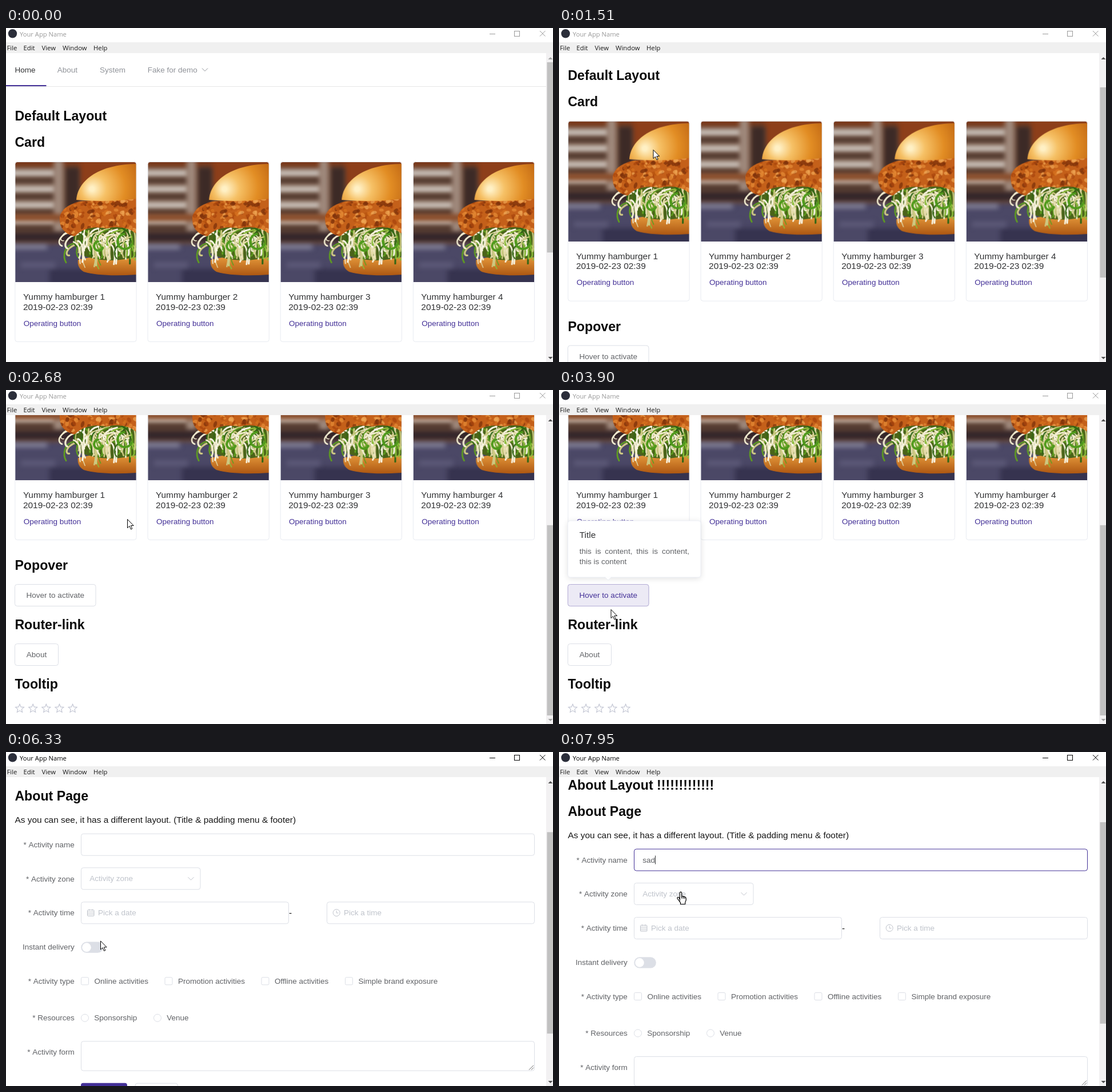
An HTML page with a canvas that plays this animation: 957 by 585 pixels, repeating every 8 s.

```html
<!DOCTYPE html>
<html lang="en">
<head>
<meta charset="utf-8">
<title>App demo</title>
<style>
html, body { margin: 0; width: 100%; height: 100%; overflow: hidden; background: #fff; }
canvas { display: block; width: 957px; height: 585px; }
</style>
</head>
<body>
<canvas id="stage" width="957" height="585"></canvas>
<script>
const LOOP = 8000, W = 957, H = 585, TOP = 44, VIEW = H - TOP;
const THEME = '#433097', INK = '#303133', BODY = '#606266', MUTED = '#909399',
      FAINT = '#bfc3cb', LINE = '#dcdfe6';
const SANS = '"Liberation Sans", Arial, sans-serif', UI = '"Open Sans", "Noto Sans", sans-serif';
const SMALL = 13.51, MEDIUM = 15.44, LARGE = 23.16;
const ctx = document.getElementById('stage').getContext('2d');

// Screen updates come in bursts: [start, end, steps]
const BURSTS = [[0, 0, 1], [350, 1140, 11], [1200, 1970, 11], [2040, 2680, 9], [2830, 3290, 7],
  [3900, 4680, 11], [5000, 5000, 1], [5230, 6010, 11], [6080, 6870, 11], [6950, 7040, 2],
  [7180, 7260, 2], [7410, 7950, 8]];

// Pointer keys: time, x, y, shape (arrow when omitted)
const POINTER = [[350, 795, 572], [1140, 97, 135], [1200, 108, 148], [1431, 155, 205],
  [1508, 164.5, 213], [1739, 190.5, 233], [1970, 198, 229], [2400, 374, 182], [2680, 212, 226],
  [2830, 200, 240], [3060, 110, 344, 'hand'], [3290, 93, 369, 'hand'], [3900, 90.5, 384],
  [4134, 66, 450, 'hand'], [4290, 62, 557, 'hand'], [4446, 60, 500], [4602, 59.5, 469, 'hand'],
  [5000, 59.5, 469], [5230, 62, 455], [5620, 110, 72, 'hand'], [5700, 116, 112], [6010, 165, 332],
  [6396, 165, 330, 'hand'], [6791, 165, 328, 'hand'], [6870, 165, 328, 'hand'], [6950, 185, 300],
  [7040, 201, 284], [7180, 197, 235], [7260, 193, 189, 'text'], [7718, 193, 189, 'text'],
  [7950, 213, 244.5, 'hand']];
const HOME_SCROLL = [[1431, 0], [1508, 71.3], [1585, 150], [1662, 245], [1739, 285], [1816, 287]];
const ABOUT_SCROLL = [[6010, 0], [6080, 20], [6238, 96.5], [6396, 150], [6554, 193], [6800, 193],
  [6870, 180], [6950, 120], [7040, 96.5]];

function snap(t) {
  const [start, end, steps] = BURSTS.filter(b => b[0] <= t).pop();
  const dt = (end - start) / (steps - 1) || 1;
  return Math.min(end, start + Math.floor((t - start) / dt + 1e-6) * dt);
}
function at(keys, t, col = 1) {
  const next = keys.findIndex(k => k[0] > t);
  if (next === 0) return keys[0][col];
  if (next < 0) return keys[keys.length - 1][col];
  const a = keys[next - 1], b = keys[next];
  return a[col] + (b[col] - a[col]) * (t - a[0]) / (b[0] - a[0]);
}
const ramp = (t, a, b) => Math.max(0, Math.min(1, (t - a) / (b - a)));

function text(str, x, y, color = BODY, size = SMALL, { weight = '', family = SANS, align = 'left' } = {}) {
  ctx.font = `${weight} ${size}px ${family}`;
  ctx.textAlign = align;
  ctx.fillStyle = color;
  ctx.fillText(str, x, y);
}
const heading = (str, y) => text(str, 15.4, y, '#0a0a0a', LARGE, { weight: 'bold' });

function box(x, y, w, h, { fill, stroke, r = 4, lw = 1 } = {}) {
  ctx.beginPath();
  ctx.roundRect(x, y, w, h, r);
  if (fill) { ctx.fillStyle = fill; ctx.fill(); }
  if (stroke) { ctx.strokeStyle = stroke; ctx.lineWidth = lw; ctx.stroke(); }
}
function poly(points, { fill, stroke, lw = 1, close = false } = {}) {
  ctx.beginPath();
  points.forEach(([x, y]) => ctx.lineTo(x, y));
  if (close) ctx.closePath();
  if (fill) { ctx.fillStyle = fill; ctx.fill(); }
  if (stroke) { ctx.strokeStyle = stroke; ctx.lineWidth = lw; ctx.stroke(); }
}
function circle(x, y, r, fill, stroke) {
  ctx.beginPath();
  ctx.arc(x, y, r, 0, Math.PI * 2);
  if (fill) { ctx.fillStyle = fill; ctx.fill(); }
  if (stroke) { ctx.strokeStyle = stroke; ctx.lineWidth = 1; ctx.stroke(); }
}
function shadowed(alpha, draw) {
  ctx.save();
  ctx.shadowColor = `rgba(0,0,0,${0.13 * alpha})`;
  ctx.shadowBlur = 11;
  ctx.shadowOffsetY = 2;
  draw();
  ctx.restore();
}
const chevron = (x, y, color) => poly([[x - 5, y - 2.5], [x, y + 2.5], [x + 5, y - 2.5]], { stroke: color });

// Soft stand-in for the food photo
function paintBurger() {
  const c = document.createElement('canvas');
  c.width = 212; c.height = 211;
  const g = c.getContext('2d');
  let seed = 7;
  const rnd = (a, b) => a + (b - a) * ((seed = seed * 16807 % 2147483647) / 2147483647);
  const pick = list => list[Math.floor(rnd(0, list.length))];
  const rect = (color, x, y, w, h) => { g.fillStyle = color; g.fillRect(x, y, w, h); };
  const shape = (color, d) => { g.fillStyle = color; g.fill(new Path2D(d)); };

  rect('#6d4a38', 0, 0, 212, 211);
  g.filter = 'blur(4px)';
  rect('#7a3a1c', -10, -10, 240, 20);
  rect('#8d3f1a', 112, -5, 110, 50);
  for (let i = 0; i < 4; i++) {
    rect('#c9c0b8', -10, 14 + i * 28, 82, 13);
    rect('#4f382f', -10, 29 + i * 28, 82, 9);
  }
  rect('#3c2a26', 88, 10, 24, 130);
  rect('#a08a7d', 68, -5, 16, 130);
  rect('#8a4a26', -10, 92, 100, 12);
  rect('#33262a', -10, 124, 120, 16);
  rect('#4b4866', -10, 144, 240, 80);
  rect('#8d8ba0', -10, 146, 66, 7);
  rect('#36334f', 60, 188, 160, 30);
  rect('#5d5a78', 10, 176, 60, 10);
  g.filter = 'none';

  const crust = g.createLinearGradient(0, 165, 0, 202);
  crust.addColorStop(0, '#e79b3c');
  crust.addColorStop(1, '#a9520f');
  shape(crust, 'M110 172Q160 160 212 168V198Q150 202 120 193Q108 186 110 172Z');
  shape('#4a6419', 'M98 118L212 108V166Q160 182 112 162Z');
  g.lineCap = 'round';
  for (let i = 0; i < 85; i++) {
    const x = rnd(102, 208), y = rnd(114, 146), drift = rnd(-30, 18);
    g.strokeStyle = i % 4 ? pick(['#f2ecd0', '#e6dcab', '#cfca84', '#fbf7e6']) : pick(['#5f9e1f', '#2f6614', '#8bbd3a']);
    g.lineWidth = rnd(1.4, 3.2);
    g.beginPath();
    g.moveTo(x, y);
    g.bezierCurveTo(x + drift, y + 4, x + drift * 1.2, y + 22, x + drift * 0.8, y + rnd(20, 45));
    g.stroke();
  }
  for (const [x, y, r] of [[192, 140, 13], [146, 148, 8]]) {
    g.strokeStyle = '#4f9a1c';
    g.lineWidth = 4;
    g.beginPath();
    g.arc(x, y, r, 0.4, 4.6);
    g.stroke();
  }
  const meat = 'M78 97Q82 78 112 70L212 62V126Q190 110 160 117Q124 110 104 131Q76 124 78 97Z';
  shape('#c4601a', meat);
  g.save();
  g.clip(new Path2D(meat));
  for (let i = 0; i < 190; i++) {
    g.fillStyle = pick(['#e58a35', '#d9731f', '#a8450d', '#b9540f', '#efa552', '#7d300a']);
    g.globalAlpha = 0.75;
    g.beginPath();
    g.ellipse(rnd(76, 212), rnd(64, 130), rnd(2, 6), rnd(1.5, 4), rnd(0, 3), 0, 7);
    g.fill();
  }
  g.restore();
  const bun = g.createRadialGradient(134, 48, 4, 150, 44, 88);
  bun.addColorStop(0, '#fff0c4');
  bun.addColorStop(0.22, '#f6c166');
  bun.addColorStop(0.55, '#e28d24');
  bun.addColorStop(1, '#b4590e');
  shape(bun, 'M107 67C109 36 142 5 212 4V65Q160 72 107 67Z');
  return c;
}
const burger = paintBurger();

function nav(active) {
  const items = [['Home', 15.4, 0, 70.5], ['About', 89.8, 70.5, 74.5], ['System', 164], ['Fake for demo', 247.7]];
  ctx.fillStyle = '#e6e6e6';
  ctx.fillRect(0, 102, 945, 1);
  for (const [label, x, left, width] of items) {
    const on = label === active;
    text(label, x, 78, on ? INK : MUTED);
    if (on) { ctx.fillStyle = THEME; ctx.fillRect(left, 100, width, 2); }
  }
  chevron(348, 73, MUTED);
}

function button(label, x, y, w, hover) {
  box(x, y, w, 38, { fill: '#fff', stroke: LINE });
  if (hover > 0) {
    ctx.save();
    ctx.globalAlpha *= hover;
    box(x, y, w, 38, { fill: '#eceaf5', stroke: '#b4acd5' });
    ctx.restore();
  }
  text(label, x + w / 2, y + 23.6, hover > 0.5 ? THEME : BODY, SMALL, { align: 'center' });
}

function star(x, y) {
  const points = Array.from({ length: 10 }, (_, i) => {
    const a = i * Math.PI / 5 - Math.PI / 2, r = i % 2 ? 3.6 : 7.8;
    return [x + r * Math.cos(a), y + r * Math.sin(a)];
  });
  poly(points, { stroke: '#c4c7d4', lw: 1.2, close: true });
}

function popover(alpha) {
  if (!alpha) return;
  ctx.save();
  ctx.globalAlpha = alpha;
  shadowed(1, () => box(15.5, 516, 232.5, 99, { fill: '#fff' }));
  box(15.5, 516, 232.5, 99, { stroke: '#ebeef5' });
  poly([[80, 614.5], [86, 620], [92, 614.5]], { fill: '#fff', stroke: '#ebeef5' });
  text('Title', 35.7, 546, INK, MEDIUM);
  const words = 'this is content, this is content,'.split(' ');
  ctx.font = `${SMALL}px ${SANS}`;
  const widths = words.map(w => ctx.measureText(w).width);
  const gap = (192.3 - widths.reduce((a, b) => a + b)) / (words.length - 1);
  words.reduce((x, w, i) => { text(w, x, 574); return x + widths[i] + gap; }, 35.7);
  text('this is content', 35.7, 592);
  ctx.restore();
}

function homePage(t) {
  nav('Home');
  heading('Default Layout', 162);
  heading('Card', 208);
  const lift = ramp(t, 1580, 1720) * (1 - ramp(t, 2040, 2300));
  for (let i = 0; i < 4; i++) {
    const x = 15.9 + i * 232.15, w = 212.2;
    const card = () => box(x, 234.5, w, 315, { fill: '#fff' });
    if (i === 0 && lift > 0) shadowed(lift, card); else card();
    ctx.save();
    ctx.beginPath();
    ctx.roundRect(x, 234.5, w, 315, 4);
    ctx.clip();
    ctx.drawImage(burger, x, 234, 212.2, 211);
    ctx.restore();
    box(x, 234.5, w, 315, { stroke: '#e8ebf1' });
    text('Yummy hamburger ' + (i + 1), x + 14, 476, INK, MEDIUM);
    text('2019-02-23 02:39', x + 14, 493.5, INK, MEDIUM);
    text('Operating button', x + 14.9, 521.5, THEME);
  }
  heading('Popover', 602);
  button('Hover to activate', 15.5, 627.5, 141.5, ramp(t, 3040, 3150) * (1 - ramp(t, 3900, 4060)));
  heading('Router-link', 706);
  button('About', 15.5, 731.5, 76, t >= 4134 && t < 4250 || t > 4560 ? 1 : 0);
  heading('Tooltip', 810);
  for (let i = 0; i < 5; i++) star(24 + i * 23.15, 845);
  popover(ramp(t, 3055, 3250) * (1 - ramp(t, 4100, 4250)));
}

function field(x, y, w, placeholder, textX, stroke = LINE) {
  box(x, y, w, 38, { fill: '#fff', stroke });
  if (placeholder) text(placeholder, textX, y + 23.7, FAINT);
}

function aboutPage(t) {
  nav('About');
  heading('About Layout ' + '!'.repeat(13), 162);
  heading('About Page', 208);
  text('As you can see, it has a different layout. (Title & padding menu & footer)', 15.4, 247, '#161616', MEDIUM);
  const labels = [['* Activity name', 285.5], ['* Activity zone', 345.2], ['* Activity time', 405], ['Instant delivery', 464.7],
    ['* Activity type', 524.4], ['* Resources', 589], ['* Activity form', 648.8]];
  for (const [label, y] of labels) text(label, 119.7, y + 4.7, BODY, SMALL, { align: 'right' });

  const focused = t >= 7410;
  field(131.5, 266.5, 793, '', 0, focused ? THEME : LINE);
  if (focused) {
    const typed = 'sad'.slice(0, Math.max(0, Math.floor((t - 7484) / 77)));
    text(typed, 146.2, 290.2);
    ctx.fillStyle = INK;
    ctx.fillRect(Math.round(146.2 + ctx.measureText(typed).width), 278, 1, 15);
  }
  field(131.5, 326, 208.5, 'Activity zone', 146.2);
  chevron(323.5, 345, FAINT);
  field(131.5, 386, 363, 'Pick a date', 161);
  box(142.5, 400, 11.5, 10.5, { stroke: FAINT, r: 1 });
  for (const y of [403, 405.5, 408]) poly([[143, y], [154, y]], { stroke: FAINT, lw: 0.8 });
  for (const x of [145.5, 151]) poly([[x, 398.5], [x, 401]], { stroke: FAINT });
  text('-', 495, 410, '#161616', MEDIUM);
  field(561.5, 386, 363, 'Pick a time', 591);
  circle(578.2, 404.8, 6, null, FAINT);
  poly([[578.2, 401], [578.2, 405.2], [581.5, 405.2]], { stroke: FAINT });

  box(131.3, 455.8, 38.6, 19.3, { fill: LINE, r: 9.65 });
  circle(141, 465.4, 7.8, '#fff');

  const types = [['Online activities', 131.5], ['Promotion activities', 278], ['Offline activities', 447], ['Simple brand exposure', 593.5]];
  for (const [label, x] of types) {
    box(x, 518, 13, 13, { fill: '#fff', stroke: LINE, r: 2 });
    text(label, x + 22.9, 529.1);
  }
  for (const [label, x] of [['Sponsorship', 138], ['Venue', 265]]) {
    circle(x, 589, 6.5, '#fff', LINE);
    text(label, x + 16.2, 593.7);
  }
  box(131.5, 630, 793, 51.5, { fill: '#fff', stroke: LINE });
  for (const d of [8, 4]) poly([[923 - d, 680], [923, 680 - d]], { stroke: '#666' });
  box(131, 703, 81, 38.5, { fill: THEME });
  text('Create', 171.5, 727, '#fff', SMALL, { align: 'center' });
  button('Reset', 226, 703.5, 74.5, 0);
  heading('Footer', 783);
}

function scrollbar(scroll, max) {
  const track = 510, thumb = track * VIEW / (VIEW + max);
  ctx.fillStyle = '#f2f1f2';
  ctx.fillRect(945, TOP, 12, VIEW);
  ctx.fillStyle = '#c1c1c1';
  ctx.fillRect(946.5, 60 + (track - thumb) * scroll / max, 10.5, thumb);
  poly([[948.5, 55], [952.5, 51], [956.5, 55]], { fill: scroll > 0 ? '#505050' : '#a3a3a3' });
  poly([[948.5, 576], [952.5, 580], [956.5, 576]], { fill: scroll < max ? '#505050' : '#a3a3a3' });
}

function chrome(focused) {
  const ink = focused ? '#000' : '#999';
  ctx.fillStyle = '#fff';
  ctx.fillRect(0, 0, W, 25);
  ctx.fillStyle = '#f0f0f0';
  ctx.fillRect(0, 25, W, 19);
  circle(11.5, 9.8, 7.7, '#2b2e3a');
  text('Your App Name', 24, 14.6, ink, 11.2, { family: UI });
  for (const [label, x] of [['File', 1.5], ['Edit', 30.5], ['View', 62.5], ['Window', 99], ['Help', 153]])
    text(label, x, 38.7, '#1a1a1a', 11.3, { family: UI });
  poly([[846, 10.5], [856, 10.5]], { stroke: ink });
  ctx.strokeRect(889.5, 5.5, 9, 9);
  poly([[934, 5], [943.5, 14.5]], { stroke: ink });
  poly([[943.5, 5], [934, 14.5]], { stroke: ink });
}

const ARROW = new Path2D('M.5 .5V15.6L4 12.3 6.5 18 8.8 17 6.4 11.5H11.2Z');
const HAND = new Path2D('M5.3 14V2.2a1.6 1.6 0 0 1 3.2 0v5.6l3.2.6 2.6.8q1.9.7 1.9 2.6v3.2l-1.6 4v3h-8.2v-2.6l-2.6-3.6-2.8-3.8q-.6-1.8 1-2.2 1.3-.2 2.3 1.2z');
const KNUCKLES = new Path2D('M8.5 8v4M11.2 8.6v3.6M13.8 9.4v3');
const BEAM = new Path2D('M-3 -8H-1L0 -7 1 -8H3M0 -7V7M-3 8H-1L0 7 1 8H3');

function pointer(t) {
  if (t < POINTER[0][0]) return;
  const shape = POINTER.filter(k => k[0] <= t + 1).pop()[3];
  ctx.save();
  ctx.translate(at(POINTER, t, 1), at(POINTER, t, 2));
  ctx.fillStyle = '#fff';
  ctx.strokeStyle = '#000';
  ctx.lineWidth = 1;
  if (shape === 'text') {
    ctx.stroke(BEAM);
  } else if (shape === 'hand') {
    ctx.translate(-6.9, 0);
    ctx.lineWidth = 1.2;
    ctx.fill(HAND);
    ctx.stroke(HAND);
    ctx.stroke(KNUCKLES);
  } else {
    ctx.fill(ARROW);
    ctx.stroke(ARROW);
  }
  ctx.restore();
}

function render(time) {
  const t = snap(time), about = t >= 5000;
  const scroll = at(about ? ABOUT_SCROLL : HOME_SCROLL, t);
  ctx.fillStyle = '#fff';
  ctx.fillRect(0, 0, W, H);
  ctx.save();
  ctx.beginPath();
  ctx.rect(0, TOP, W, VIEW);
  ctx.clip();
  ctx.translate(0, -scroll);
  (about ? aboutPage : homePage)(t);
  ctx.restore();
  scrollbar(scroll, about ? 241 : 287);
  chrome(t >= 4670);
  pointer(t);
}

const start = performance.now();
function tick() {
  render((performance.now() - start) % LOOP);
  requestAnimationFrame(tick);
}
tick();
</script>
</body>
</html>
```
